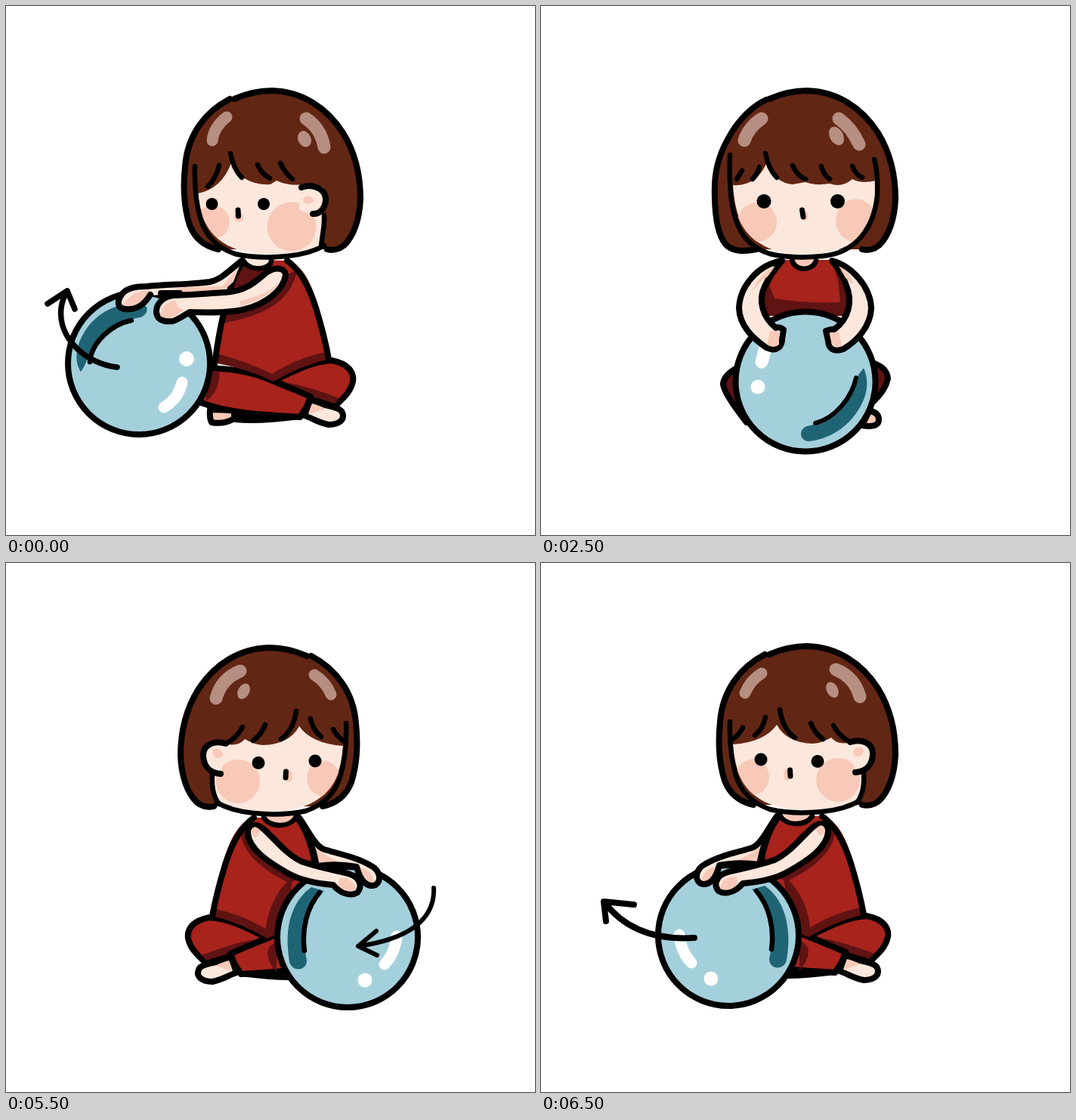
Write an HTML page that moves like this. It is 700x700 px and loops after 7000 ms.

```html
<!DOCTYPE html>
<html lang="en">
<head>
<meta charset="utf-8">
<title>Rolling the ball</title>
<style>
  html, body { margin: 0; height: 100%; overflow: hidden; background: #fff; }
  svg { display: block; width: 100%; height: 100%; }
  path, ellipse, circle { stroke-linecap: round; stroke-linejoin: round; }
  .line { fill: none; stroke: #000; stroke-width: 8; }
  .thin { stroke-width: 6.5; }
  .ink { stroke: #000; stroke-width: 8; }
  .hair { fill: #622614; }
  .skin { fill: #fbe7dc; }
  .pink { fill: #f8c9b8; }
  .red { fill: #a7231c; }
  .dark { fill: #5f1312; }
  .ball { fill: #a4d0dc; }
  .teal { fill: #1f6475; }
  .white { fill: #fff; }
  .shine { fill: none; stroke: #b78e82; }
  .glint { fill: none; stroke: #fff; stroke-width: 15; }
</style>
</head>
<body>
<svg viewBox="0 0 700 700">
  <defs>
    <clipPath id="sideFace"><path d="M254 230V246C257 288 276 328 350 329C385 329 408 321 424 313V230Z"/></clipPath>
    <clipPath id="frontFace"><path d="M254 225V246C257 288 276 328 350 329C420 329 443 290 443 240V225Z"/></clipPath>
    <clipPath id="torsoClip"><path d="M316 336C304 350 297 368 290 400C284 420 280 445 276 472Q320 480 354 496Q390 474 427 466C420 430 410 345 372 337Z"/></clipPath>

    <g id="sideHair">
      <path class="hair" d="M300 122C318 114 334 112 352 112C392 113 425 135 446 168C462 194 469 222 469 255C468 282 460 305 447 317C441 322 432 324 425 322H281C262 318 250 308 243 290C236 268 234 240 237 212C240 172 262 141 300 122Z"/>
    </g>
    <g id="sideOutline">
      <path class="line" d="M302 123C318 116 334 112 352 112C392 113 425 135 446 168C462 194 469 222 469 255C468 282 460 305 447 317C441 322 432 324 425 322M296 123C262 141 240 172 237 212C234 240 236 268 243 290C250 308 262 318 281 322"/>
      <path class="line thin" d="M250 212C249 240 252 262 257 280C263 302 277 319 303 328C325 333 352 333 372 331C392 329 409 324 421 317"/>
    </g>

    <g id="lowerBody">
      <path class="pink ink" d="M270 534Q269 545 272 551Q288 554 302 546V535Z"/>
      <path class="dark ink" d="M302 540L304 547Q335 550 388 543Z"/>
      <path class="red ink" d="M354 496C380 484 405 470 431 469C452 473 461 484 459 497C456 511 446 519 437 528L403 516Z"/>
      <path class="dark" d="M362 497C385 500 410 507 441 519L435 526L403 516Z"/>
      <path class="skin ink" d="M402 522C420 530 436 528 444 536C450 546 442 554 427 554C412 551 405 545 395 542Z"/>
      <path class="pink" d="M405 526Q416 529 423 533Q408 537 401 541Z"/>
      <path class="red ink" d="M258 479C295 479 325 483 355 497C375 505 390 511 403 517L398 530L389 544C345 541 300 540 258 525Z"/>
      <path class="dark" d="M262 483H282Q284 508 265 523Z"/>
    </g>

    <g id="torso">
      <path class="red" d="M316 336C304 350 297 368 290 400C284 420 280 445 276 472Q320 480 354 496Q390 474 427 466C420 430 410 345 372 337Z"/>
      <path class="dark" d="M276 459Q318 470 352 487Q386 465 427 457V467Q390 476 354 497Q320 480 276 472Z"/>
    </g>
    <path id="torsoLine" class="line" d="M316 336C304 350 297 368 290 400C284 420 280 445 276 474M372 337C391 350 403 377 410 399C417 422 423 445 427 467"/>

    <g id="far">
      <use href="#lowerBody"/>
      <use href="#torso"/>
      <g clip-path="url(#torsoClip)">
        <path class="dark" d="M305 335H350L340 377H290ZM385 350C377 390 345 410 280 421V400L360 360Z"/>
        <path class="red" d="M352 336H372L378 353H360Z"/>
      </g>
      <use href="#torsoLine"/>
      <circle class="ball ink" cx="176" cy="473" r="94"/>
      <path class="teal" d="M99 484C90 470 92 450 104 431C119 407 142 396 163 394Q176 392 186 398Q189 407 178 412C150 416 125 432 115 450C108 464 106 475 99 484Z"/>
      <path class="line thin" d="M166 416C140 421 113 445 111 471"/>
      <circle class="white" cx="239" cy="467" r="10"/>
      <path class="glint" d="M233 498Q228 520 209 531"/>
      <path class="skin" d="M312 337C295 350 285 362 270 365C240 369 215 368 186 371L162 375C150 382 145 394 152 400C165 405 180 398 190 383L286 378L300 364Z"/>
      <path class="pink" d="M190 376Q168 376 155 395L168 400Q180 398 190 383ZM205 380L235 372L286 371L309 344L301 365L286 378Z"/>
      <path class="line" d="M312 337C295 350 285 362 270 365C240 369 215 368 186 371C170 371 158 374 153 382C146 392 148 400 158 401C173 403 183 395 191 382M205 380H230"/>
      <path class="skin ink" d="M370 356C369 345 354 345 343 354C329 366 317 377 290 379C262 381 240 382 221 383C207 385 198 395 199 406C201 417 212 418 221 417C230 414 236 409 243 405C270 406 295 406 313 402C344 395 367 376 370 356Z"/>
      <path class="pink" d="M225 389Q206 393 204 410Q212 416 223 411L235 402Q225 400 225 389ZM310 397Q350 387 363 363Q350 381 310 390Z"/>
      <path class="skin" d="M316 337Q324 350 349 342L351 331H316Z"/>
      <path class="line thin" d="M314 337C322 350 341 350 350 341L352 333"/>

      <use href="#sideHair"/>
      <path class="skin" d="M254 248Q285 242 298 208Q314 238 350 236L358 231Q375 239 395 236L420 240L417 319Q392 329 350 329C276 328 257 288 254 248Z"/>
      <g class="pink" clip-path="url(#sideFace)">
        <circle cx="378" cy="292" r="32.5"/><ellipse cx="273" cy="286" rx="23" ry="22"/>
      </g>
      <path class="hair" d="M421 240H435V315H420Z"/>
      <path class="line thin" d="M421 277C422 292 418 304 417 319"/>
      <path class="skin" d="M388 241C405 234 424 243 423 257C422 269 413 276 404 276L388 270Z"/>
      <path class="line" d="M391 240C407 234 424 243 423 257C422 269 414 276 406 275"/>
      <ellipse class="pink" cx="400" cy="257" rx="7" ry="5"/>
      <use href="#sideOutline"/>
      <path class="line thin" d="M282 211Q278 228 267 239M297 195Q301 216 312 227M333 210Q338 222 349 228M363 208Q370 222 379 229"/>
      <path class="shine" stroke-width="15" d="M273 178Q275 160 292 147"/>
      <path class="shine" stroke-width="17" d="M397 149Q417 162 421 187"/>
      <ellipse fill="#b78e82" cx="395" cy="176" rx="8.5" ry="11" transform="rotate(-25 395 176)"/>
      <circle cx="272.500" cy="262" r="8"/><circle cx="341" cy="262" r="8"/>
      <ellipse class="pink" cx="308" cy="279" rx="6" ry="7"/>
      <path class="line" stroke-width="7" d="M307 270L307.500 278" style="stroke-width:7"/>
    </g>

    <g id="near">
      <use href="#lowerBody"/>
      <use href="#torso"/>
      <g clip-path="url(#torsoClip)">
        <path class="dark" d="M390 352C388 385 362 405 324 424L295 404L355 365ZM320 415C340 430 357 460 357 498H335Z"/>
        <path class="dark" d="M340 345L346 365L290 402L300 385Z"/>
        <path class="red" d="M312 336L352 345Q340 375 298 396L296 372Z"/>
      </g>
      <path class="dark" d="M342 502Q353 506 354 515Q354 528 342 541Z"/>
      <use href="#torsoLine"/>
      <circle class="ball ink" cx="248" cy="495" r="93"/>
      <path class="teal" d="M279 434L296 429C320 446 333 480 325 527C323 541 302 541 302 526C309 492 306 458 279 434Z"/>
      <path class="line thin" d="M285 436C302 456 309 485 305 513"/>
      <path class="glint" d="M183 494Q185 516 199 531"/>
      <circle class="white" cx="225" cy="552" r="9.5"/>
      <path class="skin" d="M312 337C301 352 291 375 279 379C255 386 235 390 218 400C204 407 203 421 211 426C221 430 231 422 236 402L288 398L301 365Z"/>
      <path class="pink" d="M232 404Q217 404 212 423Q224 428 231 416ZM250 400Q274 390 286 380L306 347L289 398Z"/>
      <path class="line" d="M312 337C301 352 291 375 279 379C255 386 235 390 218 400C204 407 203 421 211 426C221 430 231 422 236 402Q262 397 288 401"/>
      <path class="line thin" d="M307 345Q294 370 289 397"/>
      <path class="skin ink" d="M380 358C381 344 367 344 357 354C341 369 328 386 309 395C286 403 263 407 247 411C231 416 228 428 235 436C245 442 259 436 267 426C290 424 310 420 326 411C354 395 378 379 380 358Z"/>
      <path class="pink" d="M259 417Q239 416 237 433Q250 438 260 427ZM363 354Q374 343 376 357L370 364Z"/>
      <path class="pink" d="M319 332Q321 344 338 346Q353 345 359 332Z"/>
      <path class="line thin" d="M316 336C324 350 349 351 359 337"/>

      <use href="#sideHair"/>
      <path class="skin" d="M254 242Q296 239 312 216Q325 240 360 241Q372 240 384 233Q393 244 412 239L427 245L424 312Q395 329 350 329C276 328 257 288 254 242Z"/>
      <g class="pink" clip-path="url(#sideFace)">
        <circle cx="393" cy="289" r="29"/><ellipse cx="280" cy="285" rx="22" ry="23.500"/>
      </g>
      <path class="line thin" d="M427 280C428 295 426 309 418 319"/>
      <path class="skin" d="M407 241C423 233 440 240 439 256C438 269 427 279 416 279Z"/>
      <path class="line" d="M409 239C424 234 440 240 439 256C438 269 430 278 416 279"/>
      <ellipse class="pink" cx="420" cy="252" rx="7" ry="6" transform="rotate(-35 420 252)"/>
      <use href="#sideOutline"/>
      <path class="line thin" d="M267 220Q263 228 254 235M297 206Q294 221 283 230M316 196Q320 222 336 233M357 214Q362 227 373 235M387 217Q394 231 409 239"/>
      <path class="shine" stroke-width="15" d="M270 174Q277 157 292 148"/>
      <path class="shine" stroke-width="17" d="M390 143Q415 153 422 179"/>
      <ellipse fill="#b78e82" cx="385.500" cy="170" rx="7.500" ry="11" transform="rotate(-28 385 170)"/>
      <circle cx="291" cy="262" r="8.5"/><circle cx="366" cy="264.500" r="8.5"/>
      <ellipse class="pink" cx="326" cy="282" rx="5" ry="8"/>
      <path class="line" style="stroke-width:7" d="M329.500 276L330 284"/>
    </g>

    <g id="front">
      <path class="pink ink" d="M425 555Q448 559 447 546Q446 537 434 536Z"/>
      <path class="dark ink" d="M270 474Q241 486 241 501Q243 514 272 551ZM435 471Q458 477 459 493Q456 509 437 526Z"/>
      <path class="dark" d="M319 336L292 372L295 410H405L407 375L384 336Z"/>
      <path class="red" d="M319 336L302 370L309 387Q350 394 396 392L393 362L384 336Z"/>
      <circle class="ball ink" cx="350" cy="497" r="92.5"/>
      <path class="teal" d="M427 479C435 497 432 518 417 539C402 560 380 573 355 576C342 576 340 560 352 556C390 548 412 525 420 488Z"/>
      <path class="line" style="stroke-width:6" d="M417 492C411 518 390 545 363 552"/>
      <path class="glint" style="stroke-width:17" d="M292 471L297 452"/>
      <circle class="white" cx="287" cy="504" r="9.5"/>
      <path class="skin ink" d="M319 337C288 342 263 370 262 400C263 424 281 440 298 452C313 459 319 449 319 441L321 428Q315 424 311 426C293 412 287 389 296 371Q304 354 319 337Z"/>
      <path class="skin ink" d="M385 337C412 344 436 372 437 400C436 425 417 444 400 454C386 459 380 452 380 443L377 430Q384 427 388 428C407 414 413 391 404 370Q399 354 385 337Z"/>
      <path class="pink" d="M310 344Q288 355 280 377Q290 364 300 358ZM303 430L315 431V448Q308 454 299 448ZM394 344Q408 351 414 369L403 360ZM382 433L394 431L398 449Q386 455 384 444Z"/>
      <path class="pink" d="M334 332Q336 345 348 345Q361 344 364 332Z"/>
      <path class="line thin" d="M332 335C334 351 359 352 364 337"/>

      <path class="hair" d="M300 123C318 114 334 112 352 112C392 113 425 135 446 168C462 194 469 222 469 255C468 282 460 305 447 317C441 322 432 324 425 322H285C265 326 253 325 244 315C232 300 229 270 230 235C232 190 262 141 300 123Z"/>
      <path class="skin" d="M254 237Q284 239 298 209Q310 234 333 236L350 233Q362 238 382 235Q398 241 412 229Q424 236 443 231C446 290 420 329 350 329C276 328 257 288 254 237Z"/>
      <g class="pink" clip-path="url(#frontFace)">
        <circle cx="286" cy="286" r="26"/><ellipse cx="417" cy="284" rx="27" ry="28.500"/>
      </g>
      <path class="line" d="M302 123C318 116 334 112 352 112C392 113 425 135 446 168C462 194 469 222 469 255C468 282 460 305 447 317C441 322 432 324 425 322M298 124C262 141 232 190 230 235C229 270 232 300 244 315C254 326 270 325 285 322"/>
      <path class="line thin" d="M250 197C249 230 251 262 257 280C264 305 280 321 303 328C325 333 352 333 372 331C418 327 441 292 445 250Q446 220 441 203"/>
      <path class="line thin" d="M266 218L259 229M289 213Q287 222 280 229M297 195Q301 216 312 227M333 211Q339 225 350 229M371 212Q374 224 382 229M412 212Q416 223 425 227"/>
      <path class="shine" stroke-width="17" d="M269 178Q275 160 292 149"/>
      <path class="shine" stroke-width="17" d="M394 149Q411 161 421 183"/>
      <ellipse fill="#b78e82" cx="391" cy="172" rx="9" ry="13" transform="rotate(-28 391 172)"/>
      <circle cx="295" cy="258.500" r="9.5"/><circle cx="392.500" cy="258.500" r="9.5"/>
      <ellipse class="pink" cx="349" cy="278" rx="5" ry="6"/>
      <path class="line" style="stroke-width:7" d="M345.500 270L347 279"/>
    </g>

    <path id="arrowUp" class="line" style="stroke-width:7.500" d="M147 478C107 474 68 440 73 399Q75 387 81 377M55 394L81 377L91 401"/>
    <path id="arrowIn" class="line" style="stroke-width:6" d="M134 430C132 472 168 498 234 507M210 487L234 507L209 519"/>
    <path id="arrowOut" class="line" d="M203 498C155 501 112 488 84 451M123 454L83 450L86 476"/>
  </defs>
  <g id="stage"><use id="pose"/><use id="arrow"/></g>
</svg>
<script>
  const LOOP = 7000;
  const FLIP = "translate(700 0) scale(-1 1)";
  const steps = [
    { start: 0, pose: "far", arrow: "arrowUp" },
    { start: 2000, pose: "near", arrow: "arrowIn" },
    { start: 2500, pose: "front" },
    { start: 3000, pose: "near", arrow: "arrowOut", transform: FLIP },
    { start: 3500, pose: "far", arrow: "arrowUp", transform: FLIP },
    { start: 5500, pose: "near", arrow: "arrowIn", transform: FLIP },
    { start: 6000, pose: "front" },
    { start: 6500, pose: "near", arrow: "arrowOut", transform: "translate(0 -2)" },
  ];
  const [stage, pose, arrow] = ["stage", "pose", "arrow"].map(id => document.getElementById(id));
  const origin = performance.now();
  let current;

  function show(step) {
    pose.setAttribute("href", "#" + step.pose);
    arrow.setAttribute("href", step.arrow ? "#" + step.arrow : "");
    arrow.setAttribute("display", step.arrow ? "inline" : "none");
    stage.setAttribute("transform", step.transform || "translate(0 0)");
  }

  function tick() {
    const time = (performance.now() - origin) % LOOP;
    const step = steps.findLast(s => s.start <= time);
    if (step !== current) show(current = step);
    requestAnimationFrame(tick);
  }
  tick();
</script>
</body>
</html>
```
